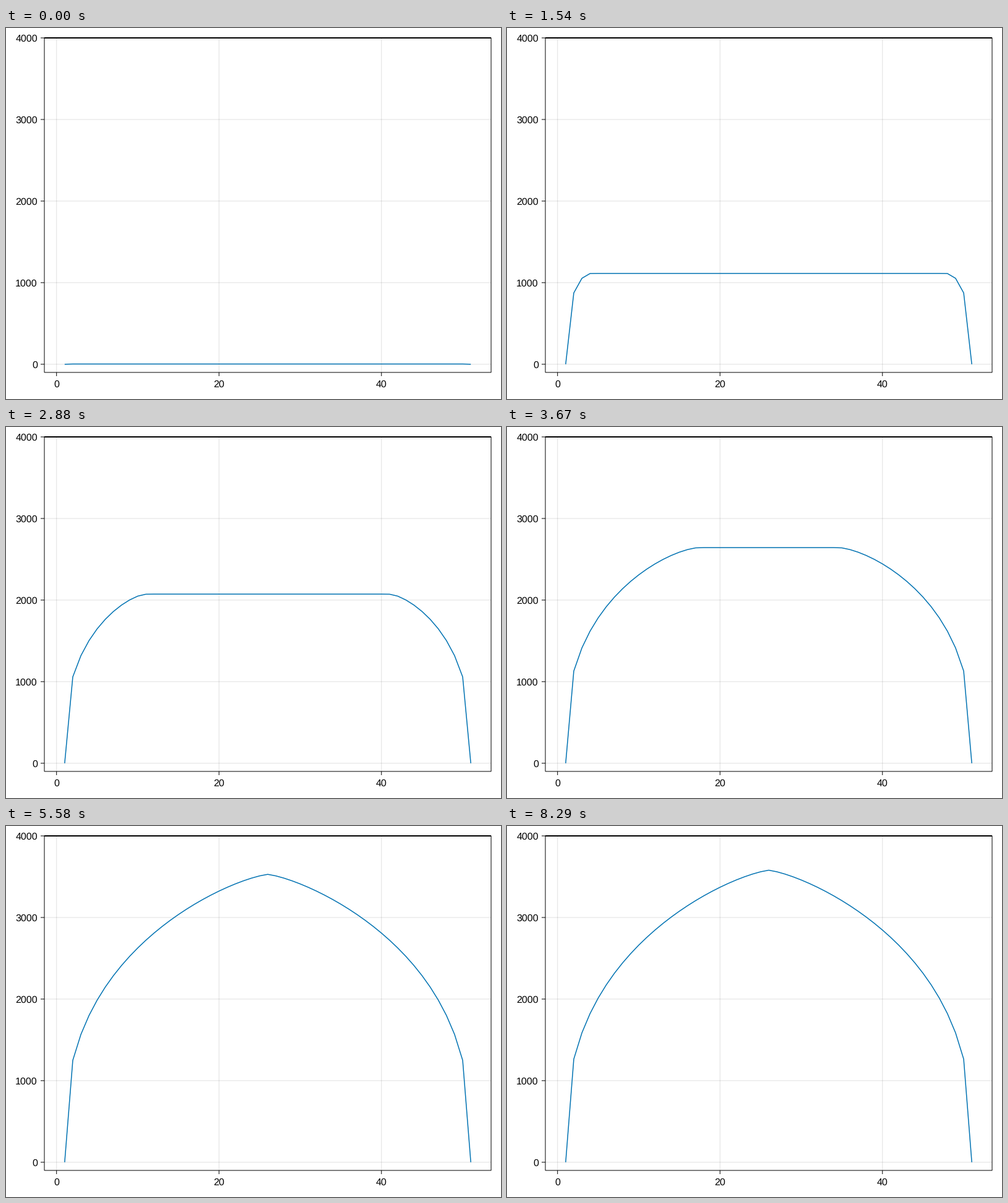
Animation of 800x600 px, one loop 8330 ms. Source, as a matplotlib script:

```python
import numpy as np
import matplotlib.pyplot as plt
from matplotlib.animation import FuncAnimation

W, H, DPI = 800, 600, 100
PX = 72 / DPI                                   # points per pixel
LEFT, RIGHT, TOP, BOTTOM = 62, 784, 16, 557     # plot box in pixels
XLIM, YLIM = (-1.5, 53.5), (-100, 4000)
SLOT, SLOTS = 17, 490                           # 17 ms * 490 = 8330 ms
FPS, STATES = 24, 200

plt.rcParams.update({
    "font.family": "Liberation Sans",
    "font.size": 16 * PX,
    "text.hinting": "none",
})


def to_x(v):
    return LEFT + (v - XLIM[0]) / (XLIM[1] - XLIM[0]) * (RIGHT - LEFT)


def to_y(v):
    return BOTTOM - (v - YLIM[0]) / (YLIM[1] - YLIM[0]) * (BOTTOM - TOP)


def ice_profiles(nodes=51, dx=30e3, accumulation=0.3, dt=1.0):
    """Shallow-ice sheet on a flat bed, saved once per century from year 10."""
    flow = 0.4e-16 * (917 * 9.81) ** 3
    h = np.zeros(nodes)
    saved = []
    for year in range(1, 100 * STATES):
        slope = np.diff(h) / dx
        mean = (h[1:] + h[:-1]) / 2
        flux = -flow * mean ** 5 * slope ** 3
        h[1:-1] += dt * (accumulation - np.diff(flux) / dx)
        if year % 100 == 10:
            saved.append(h.copy())
    return saved


fig = plt.figure(figsize=(W / DPI, H / DPI), dpi=DPI, facecolor="white")
ax = fig.add_axes([0, 0, 1, 1])
ax.set_xlim(0, W)
ax.set_ylim(H, 0)
ax.axis("off")


def stroke(xs, ys, color="black", width=1.0, alpha=1.0, z=2):
    line, = ax.plot(xs, ys, color=color, lw=width * PX, alpha=alpha, zorder=z,
                    solid_capstyle="butt", solid_joinstyle="miter")
    line.set_snap(False)
    return line


for v in (0, 20, 40):
    x = to_x(v)
    stroke([x, x], [TOP, BOTTOM], alpha=0.12, z=1)
    stroke([x, x], [BOTTOM, BOTTOM + 6])
    ax.text(x, 581, str(v), ha="center", va="baseline")

for v in range(0, 4001, 1000):
    y = to_y(v)
    stroke([LEFT, RIGHT], [y, y], alpha=0.12, z=1)
    stroke([LEFT - 6, LEFT], [y, y])
    ax.text(50.8, y + 5.8, str(v), ha="right", va="baseline")

stroke([LEFT, RIGHT, RIGHT, LEFT, LEFT, RIGHT],
       [TOP, TOP, BOTTOM, BOTTOM, TOP, TOP], z=4)

profiles = ice_profiles()
curve = stroke(to_x(np.arange(1, 52)), to_y(profiles[0]), "#0072B2", 1.5, z=3)


def update(k):
    # State reached by the end of this time slot
    state = (SLOT * k + SLOT - 2) * FPS // 1000
    curve.set_ydata(to_y(profiles[min(state, STATES - 1)]))
    return curve,


anim = FuncAnimation(fig, update, frames=SLOTS, interval=SLOT,
                     repeat=True, repeat_delay=0, blit=False)
plt.show()
```
